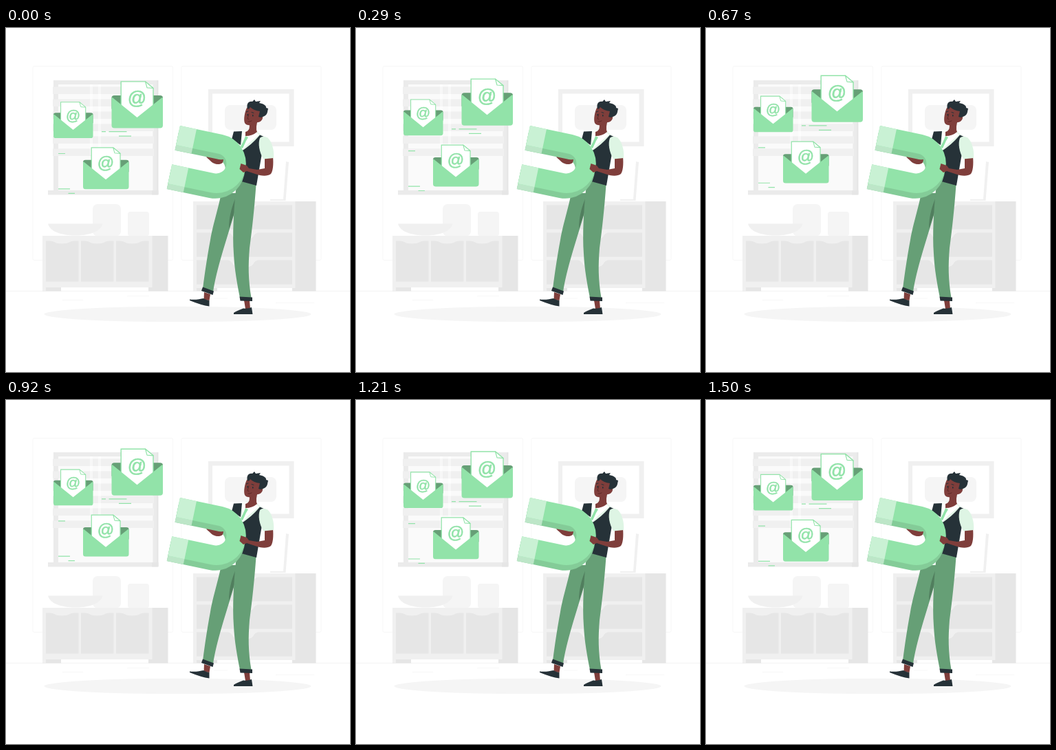
An HTML page for the animation above (1.54 s loop, 500 by 500 pixels).

```html
<!DOCTYPE html>
<html lang="en">
<head>
<meta charset="utf-8">
<title>Mail magnet</title>
<style>
  html, body { margin: 0; width: 100%; height: 100%; overflow: hidden; background: #fff; }
  svg { display: block; width: 100vw; height: 100vh; }
  .green { fill: #92e3a9; }
  .pants { fill: #669f76; }
  .skin { fill: #7f3e3b; }
  .dark { fill: #263238; }
  .g1 { fill: #fafafa; }
  .g2 { fill: #f5f5f5; }
  .g3 { fill: #f0f0f0; }
  .g4 { fill: #e6e6e6; }
  .at { font: 27px "Liberation Sans", Arial, sans-serif; text-anchor: middle; stroke: #92e3a9; stroke-width: .7; }
</style>
</head>
<body>
<svg viewBox="0 0 500 500">
  <defs>
    <g id="mail">
      <path fill="#669f76" d="M0 24q0-3.5 4-3.5h66.500q4 0 4 3.500v16H0z"/>
      <path fill="#fff" stroke="#92e3a9" stroke-width="1.4" d="M13.700 55V.4H49L60.500 10V55z"/>
      <path fill="#fff" stroke="#92e3a9" stroke-width="1.2" stroke-linejoin="round" d="M49 .4L51.500 9.300 60.500 10z"/>
      <text class="at green" x="37" y="34">@</text>
      <path class="green" d="M0 24q.3-1 1.500-.2L37 52.500 73 23.800q1.200-.8 1.500.2V64q0 4-4 4H4q-4 0-4-4z"/>
    </g>
    <path id="door" class="g4" d="M0 0H6C13 0 12 4 23.500 4S34 0 41 0H47.500V59H0z"/>
    <path id="drawer" class="g4" d="M0 0H45C53 0 51 9.500 60 9.500H75C84 9.500 82 0 90 0H139V35H0z"/>
    <path id="horseshoe" d="M0 0H63a43 43 0 0 1 0 86H0V57.500H63a14.500 14.500 0 0 0 0-29H0z"/>
    <path id="tips" d="M0 0H24.500V28.500H0zM0 57.500H24.500V86H0z"/>
  </defs>

  <!-- room -->
  <g fill="#fff" stroke="#f5f5f5" stroke-width=".8">
    <rect x="39" y="55.500" width="203.500" height="282" rx="2"/>
    <rect x="255" y="55.500" width="203" height="282" rx="2"/>
  </g>
  <path fill="none" stroke="#f0f0f0" stroke-width=".8" d="M0 382.400H500"/>
  <path fill="none" stroke="#f5f5f5" stroke-width=".8" d="M82 395.500h30M176 389.700h32M392 399.500h56M302 393h20"/>

  <!-- window -->
  <path class="g4" d="M213 76h8.500v166H213z"/>
  <path fill="#ebebeb" d="M69 76H219V236H221V242.500H61V236H69z"/>
  <path class="g1" d="M76 82H213.500V236H76z"/>
  <g id="slats" class="g3"></g>
  <path fill="#fff" opacity=".45" d="M122 82h4v103h-4zM134 82h4v103h-4z"/>
  <path class="g4" d="M212 236h9.500v6.500H212z"/>

  <!-- picture -->
  <path class="g3" d="M294 89H418.500V172H294z"/>
  <path fill="#fff" d="M300 95.500H411.500V165.500H300z"/>
  <rect class="g2" x="318" y="112" width="75" height="36" rx="8"/>

  <!-- low cabinet -->
  <rect class="g2" x="126" y="256" width="41" height="46.500" rx="7"/>
  <rect class="g2" x="177" y="267" width="31" height="35.500" rx="4"/>
  <path class="g3" d="M61 284.500H140.500C137 296 122 301.500 101 301.500S64 296 61 284.500z"/>
  <path class="g4" d="M207 302H235.500V382.500H207zM58 376h22v6.500H53V376z"/>
  <path class="g3" d="M53 302H212.500V377H58V382.500H53z"/>
  <use href="#door" x="58" y="309.500"/>
  <use href="#door" x="109" y="309.500"/>
  <use href="#door" x="160" y="309.500"/>

  <!-- drawers -->
  <path class="g3" d="M407 194l4 1-4.500 56H384v-2h19z"/>
  <path class="g4" d="M416 252H450.500V382.500H416zM277 376h30v6.500h-35V376z"/>
  <path class="g3" d="M272 252H420.500V378H277V382.500H272z"/>
  <use href="#drawer" x="277" y="257.500"/>
  <use href="#drawer" x="277" y="297.500"/>
  <use href="#drawer" x="277" y="337.500"/>

  <ellipse class="g2" cx="249.500" cy="416" rx="194" ry="11.300"/>

  <!-- legs -->
  <path class="skin" d="M288 384l9 3-1.500 9-8-1zM346 396h8l1 12h-7z"/>
  <path class="dark" d="M267 394.500C275 395.500 282 394 287 393q4 2.500 8.500 3V404.500Q284 403 267 396zM331 414Q334 411.500 345 407.500 351 408.500 357 406L358.500 416H331z"/>
  <path class="pants" d="M313 240C306 272 301 285 297 308 292 335 289 356 286 379L301 384C306 350 320 310 334 262L338 240z"/>
  <path fill="#517e5e" d="M334 246C327 263 324 276 324 292L333 265z"/>
  <path class="pants" d="M334 236C331 265 329 300 331 328 332 350 336 372 340 392H356.500C352 365 352 345 354 320 358 290 361 262 363.500 228L340 222z"/>
  <path class="dark" d="M286 376.500L302 382.500 300.500 388 284 382zM339.500 390.500L358 391.500V397L340.500 396.500z"/>

  <!-- torso and head -->
  <path fill="#e3f6e8" d="M342 152L350 147 364 150 373 157 350 195 340 180z"/>
  <path fill="#fff" d="M343 152L349 148 363 151 368 155 352 168 343 178z"/>
  <path class="green" d="M348 157l4 2-3 5-5 11-3-2 5-11z"/>
  <path class="dark" d="M331 150.500L343 150 341 170 328 162zM369 155.500L377 159 371 188 364 229 342 223V179C351 174 361 165 369 155.500z"/>
  <path class="skin" d="M352 137L367 131Q362 145 365 151 358 157 348 157V151Q354 150 354 142z"/>
  <path class="skin" d="M350 116C347 122 345 133 347 138 350 143 358 142 363 137 369 138 374 134 373 128L371 116 358 112z"/>
  <path class="dark" d="M351 117C349 110 353 106 358 107L361 104 363 107 370 106 368 109C374 110 379 113 378 116L381 117 380 122C379 127 375 129 370 130L367 129 369 121Q360 120 355 115 353 119 351 117z"/>
  <g fill="none" stroke="#263238" stroke-width="1" stroke-linecap="round">
    <path d="M349.500 122l2.500-1M357 122.500l3 1"/>
    <path stroke="#5c2725" d="M353 125l-2 7 2 .5M352 136q3 .5 5-1"/>
  </g>
  <path class="dark" d="M350.500 125h1.500v2.500h-1.500zM358 126h1.500v2.500H358z"/>

  <!-- magnet -->
  <path class="skin" d="M290 186L314 188 318 193 313 197Q306 199 300 195z"/>
  <g transform="translate(253 142) rotate(11.8)">
    <use href="#horseshoe" y="8" fill="#84cc98"/>
    <use href="#tips" y="8" fill="#bde6c8"/>
    <use href="#horseshoe" fill="#92e3a9"/>
    <use href="#tips" fill="#c9f1d4"/>
  </g>
  <path class="skin" d="M291 187.500Q303 192 316 191 316 197 309 198 301 198 296 192z"/>

  <!-- near arm -->
  <path class="skin" d="M376 187H388C389 198 388 208 385 212 380 216 370 215 362 212L350 208 345 210 339.500 205 341.500 197 350 200 353 204 365 206 376 204z"/>
  <path fill="#def5e4" d="M369 160C373 156 380 157 384 164 388 171 390 181 389 189L374 190.500C368 180 366 168 369 160z"/>

  <g id="float">
    <path fill="none" stroke="#92e3a9" stroke-width="1.200" d="M139 151.300h6M149.500 151.300h26M164 157.800h18M76 183.200h10M76 234.600h17M90.500 241h9.500"/>
    <use href="#mail" transform="translate(153.500 78.200)"/>
    <use href="#mail" transform="translate(69 108.200) scale(.772)"/>
    <use href="#mail" transform="translate(112 174.200) scale(.893)"/>
  </g>
</svg>
<script>
  const LOOP = 1540, STEPS = 37, RISE = 10, LOWEST = 1485;
  const floating = document.getElementById('float');

  document.getElementById('slats').innerHTML = Array.from({ length: 6 }, (_, i) =>
    `<rect x="68" y="${85.5 + 18 * i}" width="147" height="10.500"/>`).join('');

  function draw() {
    const time = (performance.now() + 5) % LOOP;
    const held = Math.floor(time * STEPS / LOOP) / STEPS;
    const phase = (held + 1 - LOWEST / LOOP) % 1;
    const lift = RISE * (1 - Math.abs(1 - 2 * phase));
    floating.setAttribute('transform', `translate(0 ${-lift})`);
    requestAnimationFrame(draw);
  }
  draw();
</script>
</body>
</html>
```
